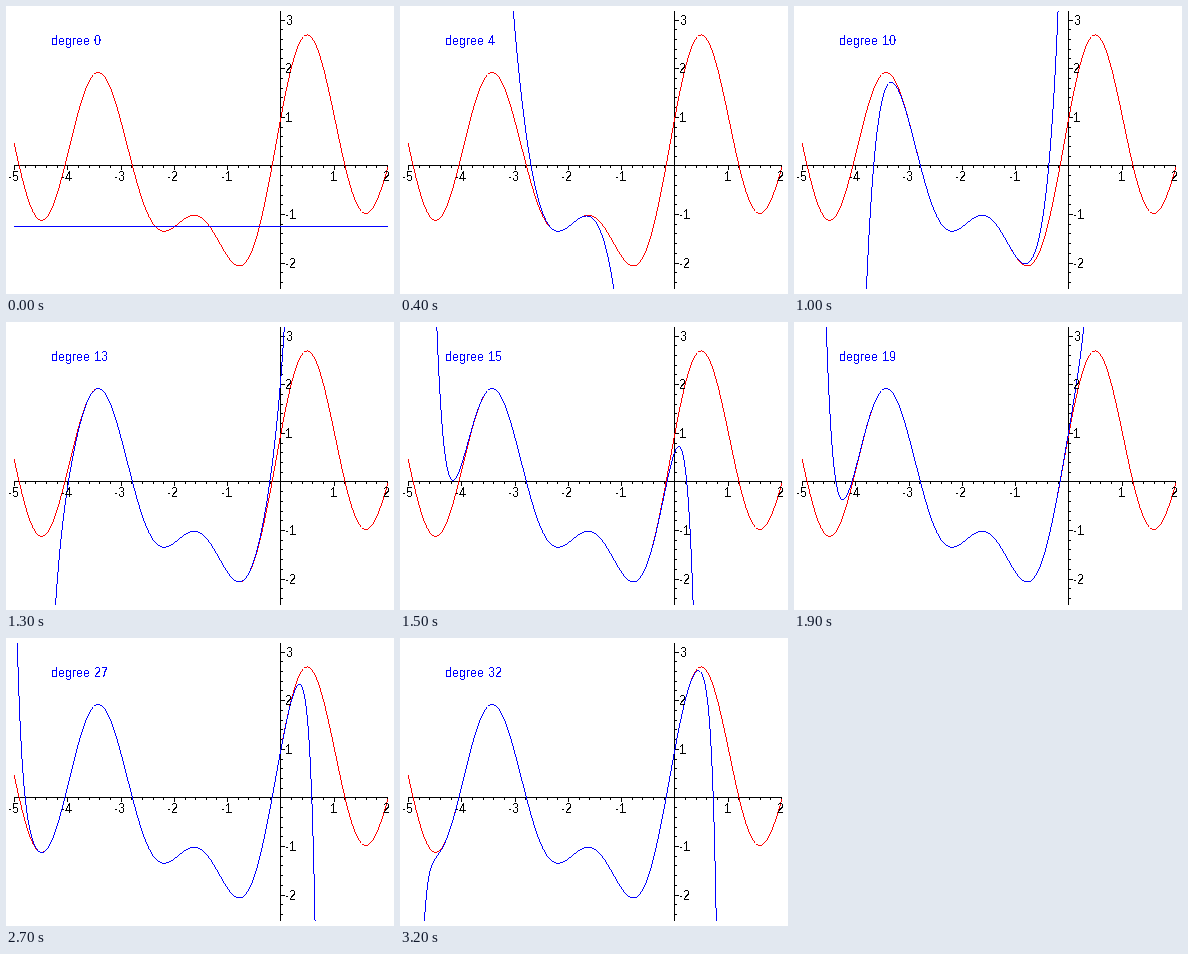
A matplotlib script that plays this animation: 388x288 px, repeating every 3300 ms.

```python
import math

import matplotlib.pyplot as plt
import numpy as np
from matplotlib.animation import FuncAnimation

W, H, DPI = 388, 288, 64
PX = 72 / DPI                                   # one pixel in points
LEFT, RIGHT, TOP, BOTTOM = 8, 381, 5, 282       # plot area, in pixels
SX, SY, Y0 = (RIGHT - LEFT) / 7, 48.6, 159.4
CENTER, MAX_DEGREE = -2.0, 32
RED, BLUE, BLACK = (255, 0, 0), (0, 0, 255), (0, 0, 0)

plt.rcParams.update({
    "font.family": "Liberation Sans",
    "text.hinting": "default",
    "text.hinting_factor": 1,
    "text.kerning_factor": 6,
})


def f(x):
    return np.sin(x) * np.exp(np.cos(x)) + np.cos(2 * x) + np.sin(math.pi * x)


def sine_series(w, phase, count):
    """Taylor coefficients of sin(w x + phase) at CENTER."""
    return [w**k * math.sin(w * CENTER + phase + k * math.pi / 2) / math.factorial(k)
            for k in range(count)]


def taylor_coefficients(count):
    cos_x = sine_series(1, math.pi / 2, count + 1)
    e = [math.exp(cos_x[0])]                    # series of exp(cos x)
    for n in range(1, count + 1):
        e.append(sum(k * cos_x[k] * e[n - k] for k in range(1, n + 1)) / n)
    # sin(x) exp(cos x) is minus the derivative of exp(cos x)
    product = [-(k + 1) * e[k + 1] for k in range(count)]
    return (np.array(product)
            + np.array(sine_series(2, math.pi / 2, count))
            + np.array(sine_series(math.pi, 0, count)))


def px(x):
    return LEFT + SX * (x + 5)


def py(y):
    return Y0 - SY * y


def draw_curve(canvas, ys, color):
    """One-pixel line: a pixel per column where flat, per row where steep."""
    u, v = px(xs), np.clip(py(ys), -H, 2 * H)
    steep = np.abs(np.diff(v)) > np.abs(np.diff(u))
    hit = np.where(steep, np.diff(np.floor(v)), np.diff(np.floor(u))) != 0
    cols = np.rint(u[1:][hit]).astype(int)
    rows = np.rint(v[1:][hit]).astype(int)
    inside = (rows >= TOP) & (rows <= BOTTOM) & (cols >= LEFT) & (cols <= RIGHT)
    canvas[rows[inside], cols[inside]] = color


def draw_axes(canvas):
    row, col = round(py(0)), round(px(0))
    canvas[row, LEFT:RIGHT + 1] = BLACK
    canvas[TOP:BOTTOM + 1, col] = BLACK
    for i in range(-25, 11):
        size = 4 if i % 5 == 0 else 2
        canvas[row:row + size + 1, round(px(i / 5))] = BLACK
    for i in range(-12, 16):
        size = 4 if i % 5 == 0 else 2
        canvas[round(py(i / 5)), col:col + size + 1] = BLACK


fig = plt.figure(figsize=(W / DPI, H / DPI), dpi=DPI, facecolor="white")
ax = fig.add_axes([0, 0, 1, 1])
ax.axis("off")


def label(x, y, text, color="black", ha="left"):
    return ax.text(x, y, text, color=color, ha=ha, va="baseline",
                   fontsize=13 * PX, antialiased=False)


xs = np.linspace(-5.009, 2.009, 60000)
coefs = taylor_coefficients(MAX_DEGREE + 1)

base = np.full((H, W, 3), 255, dtype=np.uint8)
draw_axes(base)
draw_curve(base, f(xs), RED)
plot = ax.imshow(base, extent=(0, W, H, 0), aspect="auto", interpolation="nearest")
ax.set_xlim(0, W)
ax.set_ylim(H, 0)

for n in range(-5, 3):
    if n:
        label(px(n) - 0.4, 175, str(n), ha="center")
for n in (-2, -1, 1, 2, 3):
    label(279.4, round(py(n)) + 5, str(n))
caption = label(45, 39, "", "blue")


def update(degree):
    canvas = base.copy()
    draw_curve(canvas, np.polyval(coefs[degree::-1], xs - CENTER), BLUE)
    plot.set_data(canvas)
    caption.set_text(f"degree {degree}")
    return plot, caption


anim = FuncAnimation(fig, update, frames=MAX_DEGREE + 1, interval=100,
                     repeat=True, repeat_delay=0)
plt.show()
```
